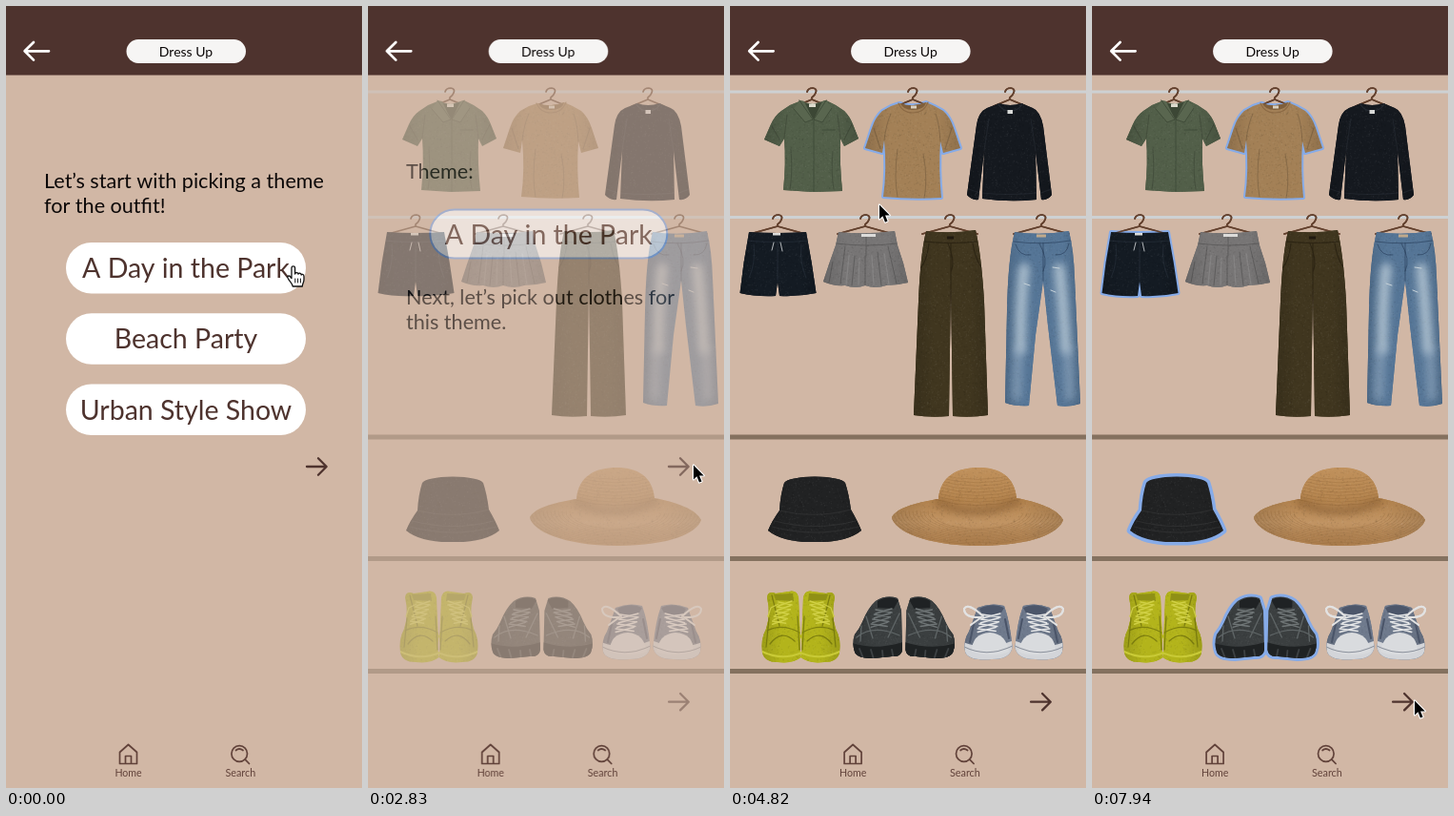
Recreate the animation shown at these times as an HTML page with a canvas. Size 374 px wide and 820 px high, loop 8000 ms.

```html
<!DOCTYPE html>
<html lang="en">
<head>
<meta charset="utf-8">
<title>Dress Up</title>
<style>
  html, body { margin: 0; width: 100%; height: 100%; overflow: hidden; background: #d1b7a5; }
  canvas { display: block; width: 374px; height: 820px; }
</style>
</head>
<body>
<canvas id="stage"></canvas>
<script>
const W = 374, H = 820, LOOP = 8000;
const S = Math.max(1, window.devicePixelRatio || 1);
const SKIN = '#d1b7a5', BROWN = '#4e332e', BLUE = '#86abe8';
const FONT = 'Lato, "Open Sans", sans-serif';

function setup(canvas) {
  canvas.width = W * S;
  canvas.height = H * S;
  const c = canvas.getContext('2d');
  c.scale(S, S);
  c.lineCap = c.lineJoin = 'round';
  return c;
}

const stage = setup(document.getElementById('stage'));
const probe = document.createElement('canvas').getContext('2d');
let g = stage;

function layer(...paints) {
  const canvas = document.createElement('canvas');
  g = setup(canvas);
  paints.forEach(paint => paint());
  g = stage;
  return canvas;
}

const shape = d => d instanceof Path2D ? d : new Path2D(d);
function fill(d, color) { g.fillStyle = color; g.fill(shape(d)); }
function line(d, color, width) {
  g.strokeStyle = color;
  g.lineWidth = width;
  g.stroke(shape(d));
}
function clipped(d, paint) { g.save(); g.clip(shape(d)); paint(); g.restore(); }
function glow(d, color, width) {
  g.save();
  g.filter = `blur(${4 * S}px)`;
  line(d, color, width);
  g.restore();
}
function text(s, x, y, size, color = '#0c0808', align = 'left') {
  g.font = `${size}px ${FONT}`;
  g.textAlign = align;
  g.fillStyle = color;
  g.fillText(s, x, y);
}
function pillPath(x, y, w, h) {
  const p = new Path2D();
  p.roundRect(x, y, w, h, h / 2);
  return p;
}
function option(label, y, chosen) {
  if (chosen) {
    const p = pillPath(64.5, y + 1, 249, 51);
    fill(p, '#fff');
    line(p, BLUE, 2);
  } else {
    fill(pillPath(63, y, 252, 53.5), '#fff');
  }
  text(label, 189, y + 37, 28.5, BROWN, 'center');
}

// ---------- shared chrome ----------
function chrome() {
  fill('M-2 0H376V820H-2Z', SKIN);
  fill('M-2 0H376V72.5H-2Z', BROWN);
  line('M45 47.3H20M29 38L19.6 47.3L29 56.6', '#fff', 2.7);
  fill(pillPath(126.5, 35, 125.5, 25), '#f6f5f4');
  text('Dress Up', 189, 52.5, 14, '#0c0808', 'center');
  const ink = '#61423a';
  line('M119.5 782.5L128.5 774.5L137.5 782.5V794.5H119.5ZM125.5 794V786.5H131.5V794', ink, 1.7);
  line('M253.5 784A8.3 8.3 0 1 1 236.9 784A8.3 8.3 0 1 1 253.5 784M251.5 790.3L255.5 794.5M241.5 780.5Q245 777.5 249 780.5', ink, 1.7);
  text('Home', 128.5, 808, 10.6, ink, 'center');
  text('Search', 246.3, 808, 10.8, ink, 'center');
}
const nextArrow = (x, y) =>
  line(`M${x} ${y}h20.5m-8.5 -8.7l8.7 8.7l-8.7 8.7`, BROWN, 2.3);

function themes(chosen) {
  chrome();
  text('Let’s start with picking a theme', 40, 190.5, 21.6);
  text('for the outfit!', 40, 216.5, 21.6);
  option('A Day in the Park', 248, chosen);
  option('Beach Party', 322.3);
  option('Urban Style Show', 396.5);
  nextArrow(316, 483);
}
function summary() {
  chrome();
  text('Theme:', 40, 180.5, 21.6);
  g.save();
  g.translate(.8, 0);
  option('A Day in the Park', 212.5, true);
  g.restore();
  text('Next, let’s pick out clothes for', 40, 313, 21.6);
  text('this theme.', 40, 339, 21.6);
  nextArrow(316, 483);
}

// ---------- wardrobe ----------
function pairOf(d, axis) {
  const p = new Path2D(d);
  p.addPath(new Path2D(d), new DOMMatrix([-1, 0, 0, 1, 2 * axis, 0]));
  return p;
}
const HIGH = 'M39 620Q40 613 48 616L62 614Q70 612 72 620L73.5 656Q77 670 74.5 683Q66 690 50 688Q36 688 34 678Q32 664 38 653Q43 638 39 620Z';
const CHUNKY = 'M153 624Q164 617 176 621L180 634L181 675Q180 683 170 682L150 684Q133 684 131 677Q128 668 131 659Q136 653 139 646Q145 631 153 624Z';
const LOW = 'M260 631Q274 625 288 629Q294 645 296.5 672Q295 685 275 685Q250 687 247 677Q245 665 251 656Q256 643 260 631Z';

const wear = {
  shirt: 'M73 100L87 103L101 99L111 104L120 110Q126 116 129 124L135 139L120 147L116 139Q115 165 118 194L87 195L56 193Q59 165 57 139L52 147L36 140L43 124Q47 115 54 110L63 104Z',
  tee: 'M178 102Q192 107 206 101L215 105L224 110Q231 116 235 128L242 149L224 154L221 142Q219 172 222 201Q192 203 161 200Q165 172 162 141L160 154L142 149L149 128Q153 116 160 110L169 105Z',
  sweater: 'M283 102Q294 106 306 102L318 107Q326 110 329 126L338 198Q334 204 327 203L321 152L322 203Q294 206 265 202L267 152L261 203Q254 204 249 198L259 125Q261 111 270 107Z',
  shorts: 'M20 237Q50 239 80 237Q86 268 90.5 301Q72 305 52 304L50 289L48 304Q28 305 10.5 301Q14 268 20 237Z',
  skirt: 'M114 237Q143 240 173 236L176 251Q183 270 187 290Q175 293 164 293Q153 297 142 293Q132 297 121 293Q108 294 98 289Q104 270 111 251Z',
  pants: 'M206 236Q232 239 258 235Q264 260 267 310L271 429Q253 432 234 430L232 290L230 430Q211 432 193 429L198 310Q200 260 206 236Z',
  jeans: 'M299 237Q327 241 356 236Q361 255 362 285L368 417Q356 421 344 419L334 335L329 288L321 345L314 419Q300 420 289 416L291 320Q292 265 299 237Z',
  bucket: 'M57 500Q62 494 89 493.5Q116 494 121 500Q125 512 127 528Q134 540 138 550Q122 563 89 562Q56 563 40 550Q44 540 52 529Q53 512 57 500Z',
  straw: 'M170 536C176 525 200 520 219 517C221 492 240 484 261 484C284 484 299 494 301 516C324 520 345 528 350 539C346 552 318 566 262 566C205 566 172 550 170 536Z',
  high: pairOf(HIGH, 74.5),
  chunky: pairOf(CHUNKY, 182.7),
  low: pairOf(LOW, 298)
};
for (const k in wear) wear[k] = shape(wear[k]);

let seed = 7;
const rnd = () => (seed = (seed * 16807) % 2147483647) / 2147483647;

// Base tone, darker sides, fold lines and a light fabric grain.
function cloth(d, color, [x, y, w, h], folds, ink = 'rgba(0,0,0,.17)') {
  fill(d, color);
  clipped(d, () => {
    const shade = g.createLinearGradient(x, 0, x + w, 0);
    shade.addColorStop(0, 'rgba(0,0,0,.13)');
    shade.addColorStop(.25, 'rgba(0,0,0,0)');
    shade.addColorStop(.75, 'rgba(0,0,0,0)');
    shade.addColorStop(1, 'rgba(0,0,0,.13)');
    g.fillStyle = shade;
    g.fillRect(x, y, w, h);
    for (let i = w * h / 7; i > 0; i--) {
      g.fillStyle = rnd() < .5 ? 'rgba(0,0,0,.06)' : 'rgba(255,255,255,.04)';
      g.fillRect(x + rnd() * w, y + rnd() * h, 1.3, 1.3);
    }
    line(folds, ink, 1.1);
  });
}
function hanger(x, y, w, h) {
  line(`M${x - 5} ${y + 4}q1 -4 6 -4q5 1 3 5q-1 3 -4 5v2m${-w} ${h}l${w} ${-h}l${w} ${h}`, '#63412e', 1.7);
}
function mirrored(axis, paint) {
  paint();
  g.save();
  g.translate(2 * axis, 0);
  g.scale(-1, 1);
  paint();
  g.restore();
}

function tops() {
  for (const x of [86, 192, 294]) hanger(x, 86, 17, 7);
  const dark = '#3c4735';
  cloth(wear.shirt, '#525f49', [36, 98, 100, 98],
    'M57 138L60 114M116 139L113 114M64 150Q66 175 63 192M108 152Q106 175 109 192M44 126L52 140M128 124L120 140');
  fill('M76 101L87 104L99 100L88 119Z', dark);
  fill('M73 99L78 100L87 119L79 122L67 108Z', '#59664f');
  fill('M101 99L97 100L88 119L97 122L107 107Z', '#59664f');
  line('M73 99L87 119L79 122L67 108M101 99L88 119L97 122L107 107M88 119V194M97 130H110', dark, .8);
  fill('M83 102.5H90V106H83Z', '#dcdacd');

  cloth(wear.tee, '#a38056', [142, 100, 101, 103],
    'M162 141Q164 124 169 113M221 142Q220 124 216 113M176 150Q172 180 176 200M203 155Q208 180 204 202M151 128L158 150M233 128L226 150');
  fill('M179 102Q192 107 206 101Q204 109 192 109Q182 109 179 102Z', '#7f5f3c');
  line('M177 102Q181 112 192 112Q204 112 208 101', '#8c6a45', 1.1);
  fill('M190 104.5H196V107.5H190Z', '#d9d0c1');

  cloth(wear.sweater, '#15191f', [249, 100, 90, 106],
    'M267 152L272 118M321 152L316 118M265 196Q294 199 322 196M251 192L262 196M337 192L327 196', 'rgba(130,140,155,.1)');
  line('M282 103Q286 110 294 110Q303 110 307 103', '#262b33', 1.2);
  fill('M291.5 109H297V113H291.5Z', '#d8d9d7');
}

function bottoms() {
  for (const x of [50, 142, 231, 327]) hanger(x, 219, 29, 8);
  cloth(wear.shorts, '#141b23', [9, 236, 83, 70],
    'M18 246Q50 249 82 246M50 248V287M25 250Q27 270 20 285M75 250Q73 270 80 285', 'rgba(120,135,155,.13)');
  line('M46 248L44 256M53 248L55 257', '#c9ccce', .9);
  fill('M45 238H53V240.5H45Z', '#dcdcda');

  cloth(wear.skirt, '#777575', [97, 236, 91, 60],
    'M112 249Q143 253 175 249M143 239V262M121 252L116 291M131 262L128 293M142 262V293M155 258L159 293M166 252L175 291M108 268L104 290', 'rgba(35,33,35,.28)');
  line('M125 262L122 292M136 264L135 292M149 262L151 292M162 260L167 292', 'rgba(190,190,190,.2)', 1.3);
  fill('M138 239H153V242H138Z', '#dcdbd9');

  cloth(wear.pants, '#40361f', [193, 235, 79, 197],
    'M204 247Q232 250 260 247M232 249V430M229 249Q237 268 232 279M209 249Q207 267 200 275M255 249Q258 267 265 275', 'rgba(15,10,0,.4)');
  fill('M228 241.5H235V244.5H228Z', '#211a10');

  cloth(wear.jeans, '#557596', [287, 236, 83, 185], '');
  clipped(wear.jeans, () => {
    glow('M309 275Q305 310 305 360M346 275Q350 310 353 360', 'rgba(200,215,225,.75)', 11);
    glow('M303 360L301 410M355 360L357 410', 'rgba(160,182,203,.6)', 9);
    line('M298 247Q327 251 358 246M329 249V288M300 250Q304 263 316 261M356 249Q354 262 342 261M325 249Q335 266 329 278', 'rgba(20,38,65,.45)', 1);
    line('M309 291l6 2m24 -19l7 1m-9 23l5 2', '#c6d2d9', 1);
  });
  fill('M322 239.5H332V242.5H322Z', '#bfa98c');
}

function hats() {
  cloth(wear.bucket, '#212223', [40, 493, 99, 70],
    'M52 529Q89 538 127 528M47 540Q89 551 132 540M44 546Q89 558 135 546', 'rgba(125,125,125,.14)');
  const tan = g.createLinearGradient(0, 484, 0, 566);
  tan.addColorStop(0, '#c0915c');
  tan.addColorStop(.42, '#b5854f');
  tan.addColorStop(.7, '#c19463');
  tan.addColorStop(1, '#ad7f4e');
  cloth(wear.straw, tan, [170, 484, 181, 83], '');
  clipped(wear.straw, () => {
    let rings = '';
    for (let y = 490; y < 520; y += 3.4) rings += `M215 ${y}Q260 ${y + 13} 305 ${y}`;
    for (let r = 48; r < 94; r += 4)
      rings += `M${260 - r} 530A${r} ${r * .36} 0 0 0 ${260 + r} 532`;
    line(rings, 'rgba(90,55,20,.15)', .9);
    glow('M217 520Q259 540 303 519', 'rgba(90,53,20,.55)', 5);
  });
}

function laces(x, y, w, n, color) {
  let d = '';
  for (let i = 0; i < n; i++) d += `M${x - i * 1.6} ${y + i * 5}l${w} ${3 - i * .2}m0 -4l${-w} 5`;
  line(d, color, 1.5);
}
function shoes() {
  cloth(wear.high, '#b3b41b', [33, 611, 83, 79], '');
  mirrored(74.5, () => {
    clipped(HIGH, () => {
      line('M34 677Q54 687 76 678', '#c9ca36', 2);
      line('M39 655Q55 647 73 657M41 642L38 672M71 640L73 675M44 618L52 650M42 669Q54 653 68 666', 'rgba(100,102,8,.65)', 1.3);
      fill('M46 617L66 616L67 624L48 623Z', '#8f9015');
    });
    laces(51, 625, 14, 5, '#d0d045');
    line('M51 627L43 631L40 640', '#cccc45', 1.2);
  });

  cloth(wear.chunky, '#3b3f40', [129, 617, 108, 68], '');
  mirrored(182.7, () => {
    clipped(CHUNKY, () => {
      fill('M128 668Q153 676 182 667V687H128Z', '#1f2223');
      line('M133 662Q150 648 178 660M143 640L150 663M178 637L166 662M138 650L137 666', '#5f6566', 1.3);
      line('M136 674l4 10m8 -9l3 10m9 -9l1 10m9 -11l2 10', '#3d4143', 1.8);
      fill('M155 624Q168 617 177 623L172 632L155 631Z', '#1f2224');
    });
    laces(153, 633, 17, 4, '#707677');
  });

  cloth(wear.low, '#6f7a8d', [245, 626, 106, 60], '');
  mirrored(298, () => {
    clipped(LOW, () => {
      fill('M245 667Q270 677 298 665V688H245Z', '#d3d5d9');
      fill('M254 677Q254 658 273 657Q290 658 293 677Q275 684 254 677Z', '#d9dbde');
      line('M246 672Q270 684 297 671', '#8b919c', 1.1);
      fill('M262 632Q276 625 288 631L284 638L265 638Z', '#4c566a');
      line('M256 648L252 667M289 643L293 663', '#4a5468', 2);
    });
    laces(265, 638, 19, 4, '#e6e7e8');
    line('M266 640Q250 625 246 632Q246 642 264 641M264 641L253 649', '#e2e2e2', 2);
  });
}

function closetRoom() {
  g.save();
  g.translate(.6, 0);
  chrome();
  nextArrow(315.5, 729.7);
  g.restore();
  line('M-5 90H380M-5 221.5H380', '#cdd1d3', 3);
  line('M-5 452H380M-5 579.5H380M-5 697.5H380', '#84715f', 5.2);
}

const items = layer(tops, bottoms, hats, shoes);
const closet = layer(closetRoom, () => g.drawImage(items, 0, 0, W, H));

// ---------- timeline ----------
const scenes = [
  [layer(() => themes(false)), 0, 0, 1],
  [layer(() => themes(true)), 170, 410, 4],
  [layer(summary), 1380, 1640, 4],
  [closet, 2830, 3070, 4]
];
const rings = [
  [wear.tee, 4070, 4320, 4, 4],
  [wear.shorts, 5640, 5640, 1, 4],
  [wear.bucket, 6710, 6710, 1, 7],
  [wear.chunky, 7120, 7120, 1, 6]
];
// start, end, steps, x, y of the pointer tip
const moves = [
  [490, 970, 7, 344, 465],
  [1050, 1210, 3, 341, 480],
  [3670, 3990, 5, 192, 178],
  [4660, 5300, 9, 53, 290],
  [5810, 6370, 8, 92, 522],
  [6790, 7040, 4, 192, 643],
  [7550, 7940, 6, 338, 727]
];
const buttons = [248, 322.3, 396.5].map(y => pillPath(63, y, 252, 53));

function stepped(t, a, b, n) {
  if (t < a) return 0;
  if (n === 1) return 1;
  return Math.min(1, (Math.floor((t - a) / (b - a) * (n - 1) + 1e-6) + 1) / n);
}
const fade = p => 1 - (1 - p) ** 1.8;
const smooth = p => p * p * (3 - 2 * p);

function pointer(t) {
  let x = 302, y = 273;
  for (const [a, b, n, tx, ty] of moves) {
    const p = smooth(stepped(t, a, b, n));
    x += (tx - x) * p;
    y += (ty - y) * p;
  }
  const hot = t < 1380 ? buttons : t < 2830 ? [] : Object.values(wear);
  g.save();
  g.translate(x, y);
  if (hot.some(p => probe.isPointInPath(p, x, y))) {
    const hand = 'M-2 1.5C-2 -.6 1.6 -.6 1.6 1.5V8C1.8 6 5 6 5 8.2C5.2 6.8 8.2 6.8 8.2 9C8.5 8 11 8 11 10.5V14C11 17 9.3 18 9.3 21H-.8C-1 18 -4 16 -5.8 12.5C-7 10 -4.5 9.2 -3.2 11L-2 12.5Z';
    fill(hand, '#fff');
    line(hand, '#111', 1.3);
    line('M1.8 13V17M4.6 13V17M7.4 13V17', '#111', 1);
  } else {
    const arrow = 'M1 1.5V16.5L4.5 13.3L7 19.6L9.6 18.5L7.1 12.4H11.8Z';
    line(arrow, '#fff', 2.2);
    fill(arrow, '#000');
  }
  g.restore();
}

function draw(t) {
  for (const [image, a, b, n] of scenes) {
    g.globalAlpha = fade(stepped(t, a, b, n));
    if (g.globalAlpha) g.drawImage(image, 0, 0, W, H);
  }
  for (const [path, a, b, n, width] of rings) {
    g.globalAlpha = fade(stepped(t, a, b, n));
    if (g.globalAlpha) line(path, BLUE, width);
  }
  g.globalAlpha = 1;
  if (t >= rings[0][1]) g.drawImage(items, 0, 0, W, H);
  pointer(t);
}

const begin = performance.now();
function tick() {
  draw((performance.now() - begin) % LOOP);
  requestAnimationFrame(tick);
}
tick();
</script>
</body>
</html>
```
